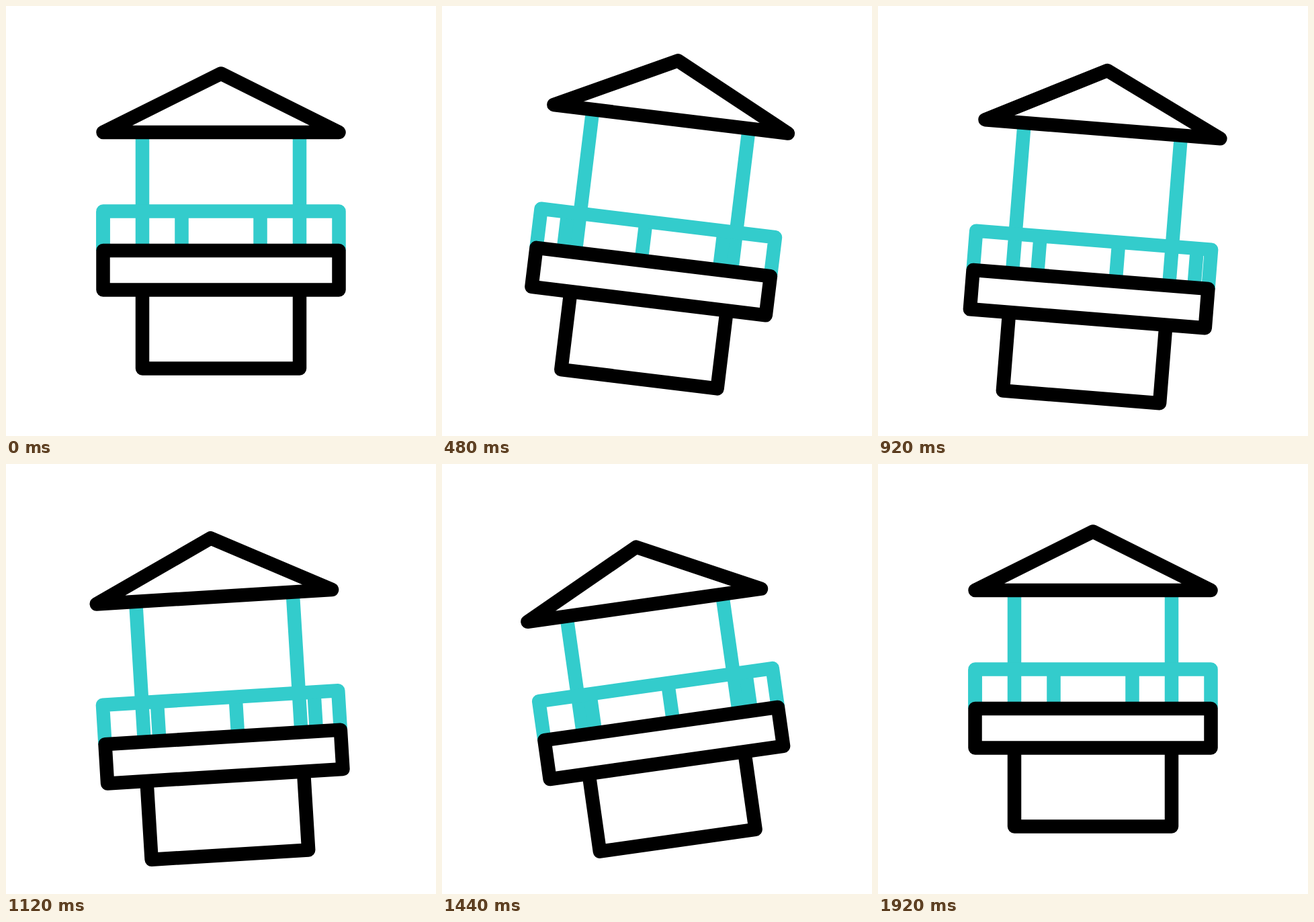
An HTML page that plays this animation: 640x640 px, repeating every 2000 ms.

```html
<!DOCTYPE html>
<html lang="en">
<head>
<meta charset="utf-8">
<title>Swaying tower</title>
<style>
  html, body { margin: 0; width: 100%; height: 100%; overflow: hidden; background: #fff; }
  svg { display: block; width: 100vw; height: 100vh; }
  path { fill: none; stroke: #000; stroke-width: 20.5; stroke-linejoin: round; }
  .teal { stroke: #3cc; }
</style>
</head>
<body>
<svg viewBox="0 0 640 640">
  <g id="tower">
    <path id="posts" class="teal"/>
    <path id="bars" class="teal"/>
    <path class="teal" d="M144.5 364V305.5H495.5V364"/>
    <path d="M203 422.5V539.5H437V422.5"/>
    <path d="M144.5 364H495.5V422.5H144.5Z"/>
    <path id="roof" d="M320 100.5L495.5 188H144.5Z"/>
  </g>
</svg>
<script>
const LOOP = 2000, STEP = 40, MOVE = 1920, GAP = 117;
const [tower, posts, bars, roof] =
  ['tower', 'posts', 'bars', 'roof'].map(id => document.getElementById(id));

// Keys are [time, value] pairs
const tilt = [[100, 0], [650, 9], [715, 9], [1335, -8.3], [1385, -8.3], [1920, 0]];
const drop = [[145, 0], [915, 43.1], [1065, 43.1], [1850, 0]];
const lift = [[92, 0], [650, 49.3], [870, 49.3], [1520, 0]];

const smooth = p => p * p * (3 - 2 * p);

function track(keys, t) {
  if (t <= keys[0][0]) return keys[0][1];
  for (let i = 1; i < keys.length; i++) {
    const [t0, v0] = keys[i - 1], [t1, v1] = keys[i];
    if (t < t1) return v0 + (v1 - v0) * smooth((t - t0) / (t1 - t0));
  }
  return keys[keys.length - 1][1];
}

// Slow start and end, four bar gaps in all
function slide(p) {
  const half = q => 2 * GAP * (1 - Math.cos(Math.PI / 2 * (2 * q) ** 1.4));
  return p < 0.5 ? half(p) : 4 * GAP - half(1 - p);
}

function draw(now) {
  const t = Math.min(MOVE, Math.floor((now % LOOP) / STEP) * STEP);
  const up = track(lift, t);
  const shift = slide(t / MOVE) % GAP;
  tower.setAttribute('transform',
    `translate(0 ${track(drop, t)}) rotate(${track(tilt, t)} 320 320)`);
  roof.setAttribute('transform', `translate(0 ${-up})`);
  posts.setAttribute('d', [203, 437].map(x => `M${x} ${188 - up}V364`).join(''));
  bars.setAttribute('d',
    [0, 1, 2].map(i => `M${144.5 + i * GAP + shift} 305.5V364`).join(''));
}

const start = performance.now();
function tick() {
  draw(performance.now() - start);
  requestAnimationFrame(tick);
}
tick();
</script>
</body>
</html>
```
